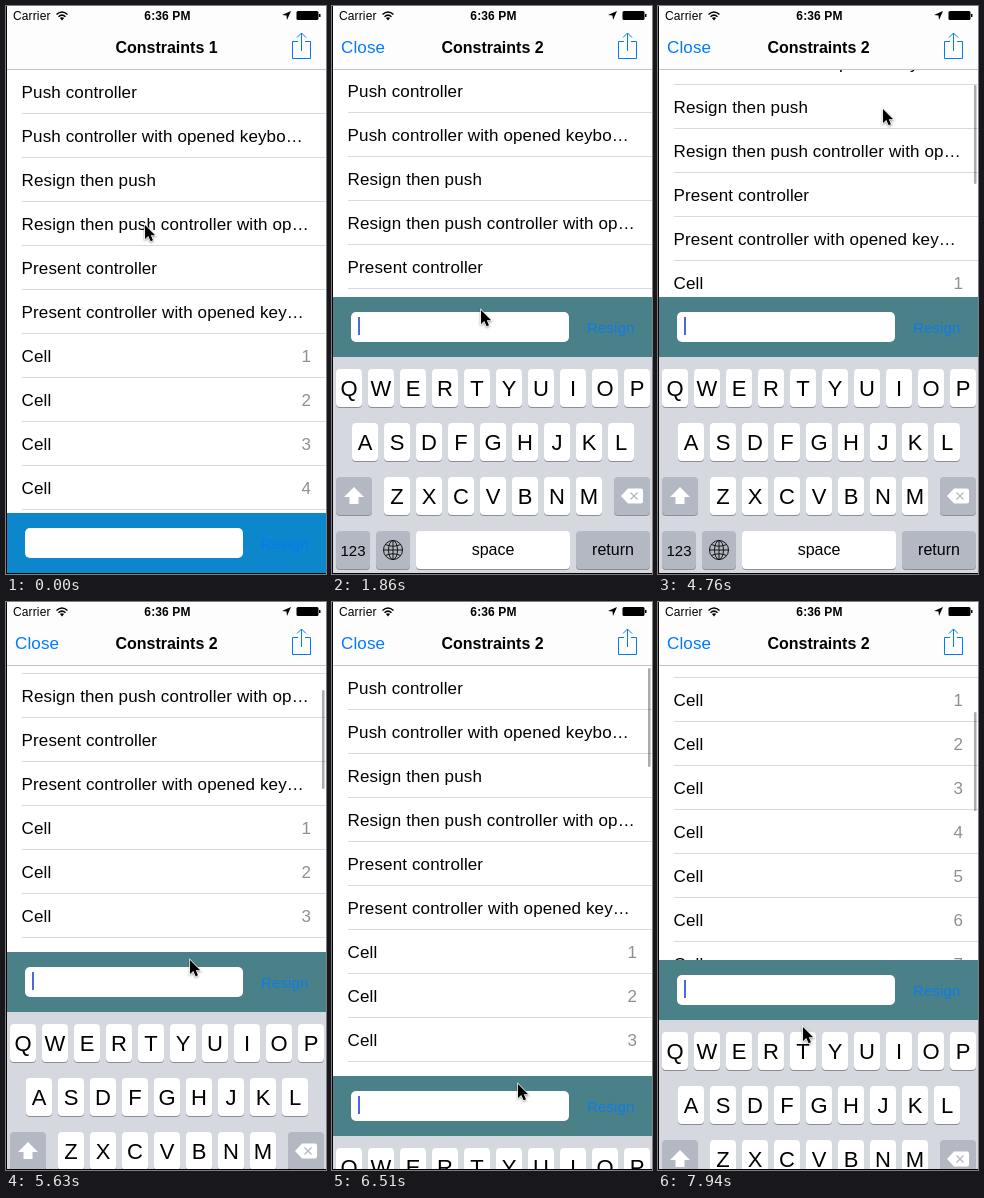
Write an HTML page that moves like this. It is 320x568 px and loops after 8 s.

```html
<!DOCTYPE html>
<html lang="en">
<head>
<meta charset="utf-8">
<title>Constraints</title>
<style>
html, body { margin: 0; width: 100%; height: 100%; overflow: hidden; background: #fff; }
svg { display: block; width: 320px; height: 568px; }
text { font: 17px "Liberation Sans", Arial, sans-serif; letter-spacing: .13px; }
.title { font-size: 16px; font-weight: bold; letter-spacing: 0; text-anchor: middle; }
.num { fill: #8e8e93; text-anchor: end; letter-spacing: 0; }
.blue { fill: #007aff; }
.resign { fill: #007aff; font-size: 15px; opacity: .8; }
.key { font-size: 22px; text-anchor: middle; letter-spacing: 0; }
.word { font-size: 16px; text-anchor: middle; letter-spacing: 0; }
.digits { font-size: 15px; text-anchor: middle; letter-spacing: 0; }
.status { font-size: 12px; }
.clock { font-size: 12px; font-weight: bold; text-anchor: middle; }
#cursor { stroke: #fff; stroke-width: 1.4; paint-order: stroke; filter: drop-shadow(0 1px 1px #0006); }
</style>
</head>
<body>
<svg id="stage" viewBox="0 0 320 568"></svg>
<script>
const LOOP = 8000, BAR_TOP = 291, ROW = 44, NAV = 64;
const PRESENT = 1290, PRESENT_MS = 520;

const rect = (x, y, w, h, fill, r = 0, extra = '') =>
  `<rect x="${x}" y="${y}" width="${w}" height="${h}" fill="${fill}" rx="${r}" ${extra}/>`;
const text = (x, y, s, cls = '') => `<text x="${x}" y="${y}" class="${cls}">${s}</text>`;
const line = (d, color, w = 1) =>
  `<path d="${d}" fill="none" stroke="${color}" stroke-width="${w}"/>`;

const labels = [
  'Push controller',
  'Push controller with opened keybo…',
  'Resign then push',
  'Resign then push controller with op…',
  'Present controller',
  'Present controller with opened key…'
];

function rows() {
  let out = '';
  for (let i = 0; i < 22; i++) {
    const y = NAV + ROW * i, n = i - labels.length + 1;
    out += text(15.6, y + 28, labels[i] || 'Cell');
    if (n > 0) out += text(305, y + 28, n, 'num');
    out += rect(16, y + ROW - 1, 304, 1, '#dad9dd');
  }
  return out;
}

const screen = (id, title, under = '', button = '') => `<g id="${id}">
  ${rect(0, 0, 320, 568, '#fff')}
  <g id="${id}Rows">${under}${rows()}</g>
  ${rect(0, 0, 320, NAV, '#fdfdfd')}${rect(0, NAV - 1, 320, 1, '#c4c4c6')}
  ${button}${text(160.5, 47, title, 'title')}
  ${line('M292 35.5H286.5V52.5H304.5V35.5H299M295.5 45V27M291 31.5L295.5 27L300 31.5', '#007aff')}</g>`;

const bar = color => rect(0, 0, 320, 60, color) +
  rect(19, 15, 218, 30, '#fff', 5) + text(255, 35.5, 'Resign', 'resign');

const cap = (x, y, w, fill) =>
  rect(x, y + 1, w, 38, '#8b8e94', 4) + rect(x, y, w, 38, fill, 4);

function keyboard() {
  const grey = '#b3b8c2', white = '#fff';
  let out = rect(0, 0, 320, 217, '#d5d8de');
  ['QWERTYUIOP', 'ASDFGHJKL', 'ZXCVBNM'].forEach((keys, r) => {
    const left = 164 - 16 * keys.length;
    [...keys].forEach((k, i) => {
      const x = left + 32 * i, y = 12 + 54 * r;
      out += cap(x, y, 26, white) + text(x + 13, y + 27, k, 'key');
    });
  });
  out += cap(4, 120, 36, grey) + cap(282, 120, 36, grey);
  out += `<path d="M22 130L32 140H26.5V147H17.5V140H12Z" fill="${white}"/>`;
  out += `<path d="M289 139L296 131.5H309Q311 131.5 311 133.5V144.5Q311 146.5 309 146.5H296Z" fill="${white}"/>`;
  out += line('M298.5 135.5L305.5 142.5M305.5 135.5L298.5 142.5', grey, 1.3);
  out += cap(4, 174, 34, grey) + cap(44, 174, 34, grey) + cap(84, 174, 154, white) + cap(244, 174, 74, grey);
  out += text(21, 199, '123', 'digits') + text(161, 198, 'space', 'word') + text(281, 198, 'return', 'word');
  const globe = [9.5, 4.5].map(r =>
    `<ellipse cx="61" cy="193" rx="${r}" ry="9.5" fill="none" stroke="#111"/>`).join('');
  return out + globe + line('M51.5 193H70.5M61 183.5V202.5M53.5 187.5Q61 191 68.5 187.5M53.5 198.5Q61 195 68.5 198.5', '#111');
}

const statusBar = text(7, 14, 'Carrier', 'status') + text(161.5, 14, '6:36 PM', 'clock') +
  line('M50.5 8.5Q56 3.5 61.5 8.5M52.5 10.7Q56 7.5 59.5 10.7', '#000', 1.5) +
  '<path d="M56 14.5L53.9 12Q56 10.3 58.1 12Z"/><path d="M285 5L281 14L280.5 9.5L276 9Z"/>' +
  rect(290.5, 5, 22, 9, '#000', 1.5) + rect(313, 8, 1.5, 3, '#000');

document.getElementById('stage').innerHTML =
  screen('first', 'Constraints 1', rect(0, 284, 320, 43, '#d9d9d9', 0, 'id="pressed"')) +
  `<g transform="translate(0 507)">${bar('#0c87cb')}</g>` +
  screen('second', 'Constraints 2', '', text(9, 47, 'Close', 'blue')) +
  rect(316, 0, 2.5, 99, '#000', 1.25, 'id="thumb" fill-opacity=".33"') +
  `<g id="input">${bar('#4a8188')}${rect(26, 20, 2, 18, '#4a69df', 0, 'id="caret"')}
    <g transform="translate(0 60)">${keyboard()}</g></g>` +
  statusBar + rect(0, 0, 1, 568, '#000') + rect(0, 567, 320, 1, '#000') +
  '<path id="cursor" d="M0 0V14L3.3 11L5.6 16.2L8 15.2L5.8 10.2H10.2Z"/>';

const clamp = v => Math.max(0, Math.min(1, v));
const smooth = p => p * p * (3 - 2 * p);
const easeOut = p => 1 - (1 - p) ** 2;
const mix = (a, b, p) => a + (b - a) * p;

// Each pointer move eases to a point and rests there
const moves = [
  { from: 90, to: 890, x: 149, y: 304 },
  { from: 2100, to: 2620, x: 261, y: 320 },
  { from: 3640, to: 4050, x: 214, y: 138 },
  { from: 4260, to: 4500, x: 214, y: 218 },
  { from: 4580, to: 4860, x: 227, y: 86, ease: easeOut },
  { from: 4900, to: 5540, x: 184, y: 357.5 },
  { from: 5630, to: 6420, x: 186, y: 482 },
  { from: 6907, to: 7400, x: 163, y: 177 },
  { from: 7450, to: 8200, x: 138, y: 519 }
];

// While held, list offset + touch height equals the grip
const drags = [
  { from: 4580, to: 4860, grip: 219 },
  { from: 5340, to: 7400, grip: 482 },
  { from: 7720, to: LOOP, grip: 618 }
];
const TOUCH_LAG = 90;

function pointer(t) {
  let x = 139, y = 219;
  for (const m of moves) {
    const p = (m.ease || smooth)(clamp((t - m.from) / (m.to - m.from)));
    x = mix(x, m.x, p);
    y = mix(y, m.y, p);
  }
  return { x, y };
}

const touch = t => pointer(t - TOUCH_LAG).y;
const held = (drag, t) => Math.max(0, drag.grip - touch(t));

function scrollAt(t) {
  const i = drags.findLastIndex(d => t >= d.from);
  if (i < 0) return t < 300 ? 0 : 1;
  const drag = drags[i], next = drags[i + 1];
  const offset = held(drag, Math.min(t, drag.to));
  if (t <= drag.to) return offset;
  const glide = (t - drag.to) / (next.from - drag.to);
  return mix(offset, held(next, next.from), easeOut(glide));
}

// A held touch pushes the keyboard down
function barAt(t) {
  const dragging = drags.some(d => t >= d.from && t <= d.to);
  return dragging ? Math.max(BAR_TOP, touch(t) - 8) : BAR_TOP;
}

function caretAlpha(t) {
  if (t < 2490) return 1;
  const p = (t - 2090) % 800;
  return p < 600 ? clamp((520 - p) / 80) : clamp((p - 720) / 80);
}

const el = id => document.getElementById(id);
const move = (id, x, y) =>
  el(id).setAttribute('transform', `translate(${Math.round(x)} ${Math.round(y)})`);
const show = (id, on) => { el(id).style.display = on ? '' : 'none'; };

function draw(t) {
  const below = (1 - clamp((t - PRESENT) / PRESENT_MS)) ** 3;
  const offset = scrollAt(t), tip = pointer(t);
  for (const id of ['second', 'input', 'pressed']) show(id, t >= PRESENT + 40);
  show('thumb', t >= 4650);
  move('firstRows', 0, -Math.min(offset, 1));
  move('secondRows', 0, -offset);
  move('second', 0, 568 * below);
  move('input', 0, barAt(t) + (568 - BAR_TOP) * below);
  move('thumb', 0, 66 + offset * .174);
  move('cursor', tip.x, tip.y);
  el('caret').style.opacity = caretAlpha(t);
}

const start = performance.now();
function tick() {
  draw((performance.now() - start) % LOOP);
  requestAnimationFrame(tick);
}
tick();
</script>
</body>
</html>
```
